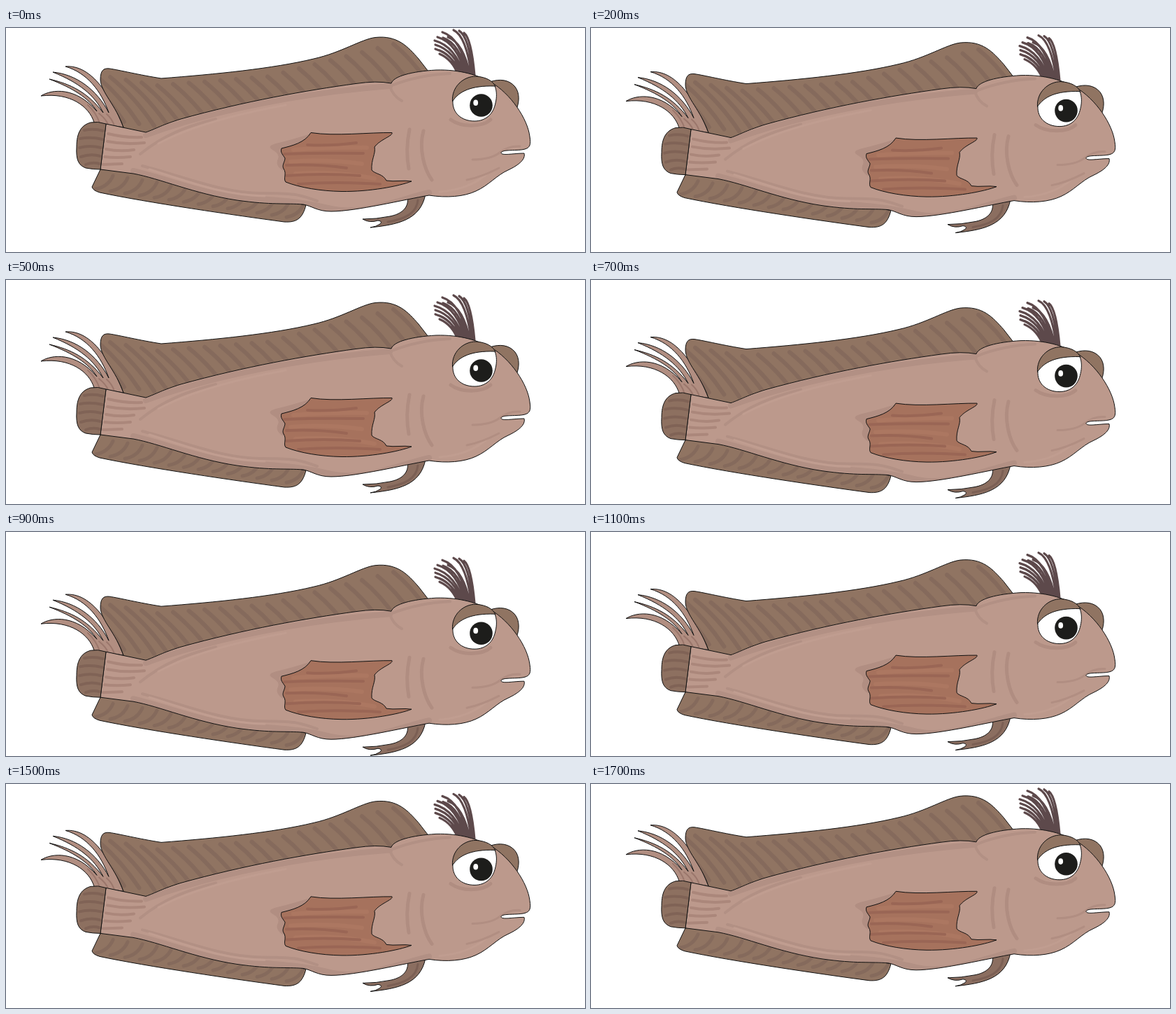
Recreate the animation shown at these times as an HTML page. Size 828 px wide and 320 px high, loop 1800 ms.

```html
<!DOCTYPE html>
<html lang="en">
<head>
<meta charset="utf-8">
<title>Floating fish</title>
<style>
  html, body { margin: 0; width: 100%; height: 100%; overflow: hidden; background: #fff; }
  svg { display: block; width: 828px; height: 320px; }
  .line { stroke: #111; stroke-width: 1; stroke-linejoin: round; }
  .fin { fill: #907462; }
  .skin { fill: #bc998c; }
  .marks { fill: none; stroke-linecap: round; }
</style>
</head>
<body>
<svg viewBox="0 0 828 320">
  <defs>
    <path id="dorsal" d="M168 142C157 110 136 92 135 74C135 61 139 57 148 58C162 60 190 67 222 72C300 66 382 58 440 44C480 35 508 16 528 13.500C560 10 575 27 590 44L604 62L552 90L200 160Z"/>
    <path id="anal" d="M135 202L123 227Q124 232 134 235C200 249 330 268 398 277C416 278 424 272 429 253L330 235L182 200Z"/>
    <path id="caudal" d="M143 137Q131 133 121 135C107 139 101 150 101 170C100 187 103 196 114 200Q124 202 135 202Z"/>
    <path id="body" d="M143 137L200 149C214 144 224 138 250 130C340 105 430 89 500 79.500Q530 75 551 79C554 69 580 62 615 60C650 59 676 68 693 77C722 94 746 130 749 155C751 167 749 171 742 173C732 176 710 173 708 178C708 183 725 179 741 179C743 187 735 195 718 203C702 210 690 225 672 233C655 241 630 243 605 239C570 245 500 262 465 262C445 262 437 254 425 252C400 250 380 253 330 246C270 237 220 215 182 208L135 202Z"/>
    <path id="pectoral" d="M436 149.500C470 155 520 149 552 149.500C554 154 535 159 527 170C529 180 522 187 523 203C528 209 539 208 544 218C556 220 568 217 580 219C562 226 520 234 480 233.500C450 233 420 228 400 220C396 215 402 208 397 201C394 196 399 191 399 186C396 181 392 178 394 172C410 168 427 164 436 149.500Z"/>
    <clipPath id="inDorsal"><use href="#dorsal"/></clipPath>
    <clipPath id="inAnal"><use href="#anal"/></clipPath>
    <clipPath id="inCaudal"><use href="#caudal"/></clipPath>
    <clipPath id="inBody"><use href="#body"/></clipPath>
    <clipPath id="inPectoral"><use href="#pectoral"/></clipPath>
  </defs>
  <g id="fish">
    <path class="line" fill="#b18e81" d="M50 97C66 87 100 84 130 119C118 100 96 86 62 73C92 80 116 91 139 121C126 95 104 78 67 63C100 66 130 88 147 121C136 90 116 64 85 55C120 52 148 92 168 142L126 135C119 112 92 92 50 97Z"/>
    <path class="marks" stroke="#9b776c" stroke-width="2" d="M117 110Q129 121 134 136M133 122Q143 130 146 138M144 123Q152 130 155 140"/>
    <use href="#dorsal" class="fin"/>
    <g clip-path="url(#inDorsal)"><path id="dorsalMarks" class="marks" stroke="#856a5c" stroke-width="6"/></g>
    <use href="#dorsal" class="line" fill="none"/>
    <use href="#anal" class="fin"/>
    <g clip-path="url(#inAnal)"><path id="analMarks" class="marks" stroke="#856a5c" stroke-width="5"/></g>
    <use href="#anal" class="line" fill="none"/>
    <path class="line" fill="#8b6e60" d="M574 241C577 257 565 266 549 269Q530 273 510 273Q520 279 532 275Q539 276 535 280Q529 284 521 285C559 281 593 275 600 237Z"/>
    <path class="marks" stroke="#7b5f54" stroke-width="3" d="M589 246C587 265 570 273 546 277"/>
    <path class="line fin" d="M692 77C706 72 720 74 728 84C735 93 734 106 730 116L705 100Z"/>
    <path id="tuft" class="marks" stroke="#5d494b" stroke-width="3.200"/>

    <use href="#body" class="skin"/>
    <g clip-path="url(#inBody)" class="marks">
      <path stroke="#b29084" stroke-width="8" d="M200 153C300 116 430 92 549 83M182 204C240 218 280 237 340 242S420 247 465 258S570 242 605 235"/>
      <path stroke="#b29084" stroke-width="4" d="M192 180C224 154 256 141 300 130M549 83Q553 97 566 104M552 82Q590 67 635 65M195 197C250 211 310 236 365 236S420 239 445 247"/>
      <path stroke="#c09d90" stroke-width="3" d="M218 165C270 137 340 121 400 110M205 202C270 222 310 239 370 240M620 234Q660 231 686 210"/>
      <path stroke="#b08d81" stroke-width="5" d="M577 145Q571 174 576 201M597 147C590 172 598 202 609 217M636 131C651 142 681 142 693 131"/>
      <path stroke="#b18e82" stroke-width="3" d="M667 188Q693 188 706 178T735 169M659 217Q680 213 705 200"/>
      <path stroke="#ab877b" stroke-width="4" d="M146 151Q170 157 194 156M145 162Q170 167 198 164M143 173Q162 177 183 174M141 184Q158 186 178 184M139 195L166 194"/>
      <path fill="#b18e82" d="M436 151Q407 160 390 164Q371 168 381 174Q392 180 389 187Q384 196 396 204L412 170Z"/>
    </g>
    <use href="#body" class="line" fill="none"/>

    <use href="#caudal" fill="#8d7060"/>
    <g clip-path="url(#inCaudal)"><path class="marks" stroke="#806356" stroke-width="4" d="M112 146Q126 143 139 147M106 158Q121 155 138 159M105 171Q120 167 136 171M107 184Q121 179 135 183M114 195Q124 191 134 194"/></g>
    <use href="#caudal" class="line" fill="none"/>

    <use href="#pectoral" fill="#a6725d"/>
    <g clip-path="url(#inPectoral)">
      <path class="marks" stroke="#ac7761" stroke-width="6" d="M411 174Q465 170 516 171M407 191Q457 187 509 194M414 208Q470 204 527 215"/>
      <path class="marks" stroke="#9a6655" stroke-width="4" d="M431 167Q463 169 501 164M398 180Q450 178 511 179M401 196Q446 194 487 200M401 211Q455 207 506 211M418 223Q470 219 535 223"/>
    </g>
    <use href="#pectoral" class="line" fill="none"/>

    <path class="line fin" d="M638.500 105C637 84 654 69 672 69C687 70 697 76 700 84L690 92Z"/>
    <path class="line" fill="#fff" d="M639 104C648 91 664 82 699 83C702 90 702 99 700 107C697 123 686 133 670 133C651 133 638 121 639 104Z"/>
    <circle cx="679.500" cy="110.500" r="16.300" fill="#1d1d1b"/>
    <ellipse cx="671.700" cy="106.800" rx="3.400" ry="4.300" fill="#fff"/>
  </g>
</svg>
<script>
  const $ = id => document.getElementById(id);
  const setPath = (id, n, f) =>
    $(id).setAttribute('d', Array.from({ length: n }, (_, i) => f(i)).join(''));

  // Slanted fin rays follow each fin's long edge.
  setPath('dorsalMarks', 21, i => {
    const x = 104 + i * 22.5;
    const y = i < 5 ? 62 + i * 4 : 82 - (i - 5) * 1.8 - Math.max(0, i - 12) * 4;
    const h = 72 - i;
    return `M${x} ${y}q${h * .5} ${h * .4} ${h * .9} ${h}`;
  });
  setPath('analMarks', 14, i => `M${128 + i * 21} ${230 + i * 3.1}q18 -3 25 -19`);

  const tips = [[655, 7], [648, 4], [640, 3], [632, 13], [624, 6], [625, 14], [617, 13],
    [613, 18], [614, 24], [614, 30], [620, 32], [620, 37]];
  setPath('tuft', tips.length, i => {
    const [x, y] = tips[i], root = 670 - i * 2.1;
    return `M${x} ${y}Q${x + (root - x) * .7} ${y + 8} ${root} 68`;
  });

  const LOOP = 1800, STEP = 100, RISE = 3.8;
  function draw(now) {
    const step = Math.floor(now % LOOP / STEP);
    const y = RISE * Math.min(step, LOOP / STEP - step);
    $('fish').setAttribute('transform', `translate(0 ${y})`);
    requestAnimationFrame(draw);
  }
  draw(performance.now());
</script>
</body>
</html>
```
